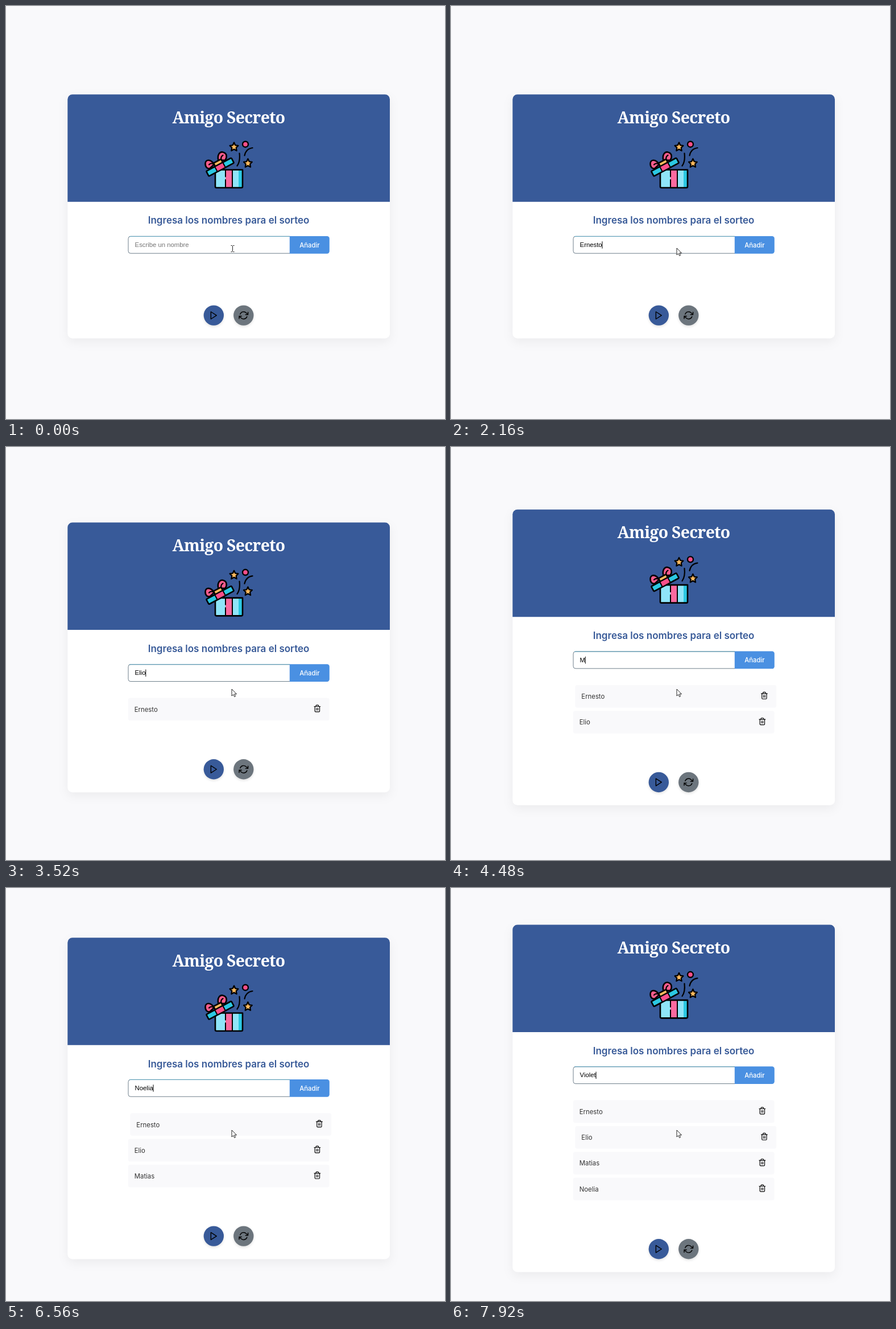
An HTML page that plays this animation: 772 by 725 pixels, repeating every 8 s.

```html
<!DOCTYPE html>
<html lang="es">
<head>
<meta charset="utf-8">
<title>Amigo Secreto</title>
<style>
html, body { margin: 0; width: 100%; height: 100%; overflow: hidden; background: #f9f9fb; }
svg { display: block; }
text { font: 400 11.33px Inter, sans-serif; white-space: pre; }
.title { font: 700 28.3px Merriweather, "Noto Serif", serif; letter-spacing: -.7px; fill: #fff; text-anchor: middle; }
.sub { font-size: 17px; font-weight: 600; fill: #385a98; text-anchor: middle; }
.add { font-weight: 500; fill: #fff; text-anchor: middle; }
.field { font-family: Arial, "Liberation Sans", sans-serif; }
.name { fill: #333; }
.card { filter: drop-shadow(0 6px 9px rgba(0, 0, 0, .055)); }
.round { filter: drop-shadow(0 2px 2px rgba(0, 0, 0, .12)); }
.icon { fill: none; stroke: #000; stroke-width: 2; stroke-linecap: round; stroke-linejoin: round; }
.gift { stroke: #000; stroke-width: 2.6; stroke-linecap: round; stroke-linejoin: round; }
</style>
</head>
<body>
<svg width="772" height="725" viewBox="0 0 772 725">
  <defs>
    <path id="star" d="M0-7.4 2.3-2.6 7.4-1.9 3.7 1.8 4.6 7 0 4.5-4.6 7-3.7 1.8-7.4-1.9-2.3-2.6Z" fill="#fdb95e" stroke-width="2.3"/>
    <g id="trash" class="icon">
      <path d="M3 6H21M19 6v14a2 2 0 0 1-2 2H7a2 2 0 0 1-2-2V6m3 0V4a2 2 0 0 1 2-2h4a2 2 0 0 1 2 2v2M10 11v6M14 11v6"/>
    </g>
  </defs>
  <g id="card">
    <rect id="panel" class="card" x="108.3" width="566.7" height="428.3" rx="8.5" fill="#fff"/>
    <path d="M108.3 188.5V8.5a8.5 8.5 0 0 1 8.5-8.5H666.5a8.5 8.5 0 0 1 8.5 8.5V188.5Z" fill="#385a99"/>
    <text class="title" x="391.5" y="50.5">Amigo Secreto</text>

    <g class="gift" transform="translate(0 -155.2)">
      <g stroke="none">
        <path d="M368 288H416V319H368Z" fill="#8fe5f8"/>
        <path d="M409 288H416V319H409Z" fill="#2cc8e2"/>
        <path d="M386 288H398V319H386Z" fill="#fb6a9f"/>
      </g>
      <path d="M386 288V299.500M386 305V319M398 288V319" stroke-width="2"/>
      <path d="M368 287.500H416V317a2 2 0 0 1-2 2H370a2 2 0 0 1-2-2Z" fill="none"/>
      <path d="M366 278C360 268 350.500 269 350.500 277C350.500 283 354 286 358.500 285Z" fill="#fb5c8c"/>
      <path d="M366 278C362 275.500 359 276 357 278.500" fill="none" stroke-width="2.2"/>
      <path d="M373.500 271C371 261 376 255.500 381 256.500C389 258 389 266 385.500 270.500Z" fill="#fb5c8c"/>
      <path d="M378.500 270C377.500 266 379 263.500 381.500 262" fill="none" stroke-width="2.2"/>
      <g transform="translate(376.500 282.700) rotate(-28)">
        <rect x="-7" y="-11.500" width="15" height="7" rx="1" fill="#fdb95e"/>
        <rect x="-25" y="-5" width="50" height="10" rx="1.500" fill="#2cc8e2"/>
        <rect x="-8" y="-5" width="16" height="10" fill="#fb4f8a" stroke-width="2"/>
      </g>
      <path d="M410.500 258.500C411.500 267 410.500 275 406.500 280.500M419.500 262.500C421 255 426 250 433.500 249" fill="none" stroke-width="2.2"/>
      <circle cx="421" cy="242.700" r="5" fill="#fb4f8a" stroke-width="2.4"/>
      <use href="#star" x="401" y="247"/>
      <use href="#star" x="425.400" y="275.700"/>
    </g>

    <text class="sub" x="391.6" y="227.3">Ingresa los nombres para el sorteo</text>
    <path d="M499 249.200H219a4 4 0 0 0-4 4V275a4 4 0 0 0 4 4H499" fill="#fff" stroke="#6f7f8c"/>
    <path d="M217 249.700Q218 249.200 219 249.200H499" fill="none" stroke="#5aa3bf"/>
    <path d="M498.800 248.700H564.600a4.200 4.200 0 0 1 4.200 4.200V275.300a4.200 4.200 0 0 1-4.200 4.200H498.800Z" fill="#4a90e2"/>
    <text class="add" x="534" y="268.4">Añadir</text>
    <text class="field" id="field" x="226.6" y="267.9"></text>
    <rect id="caret" y="258" width="1" height="12.500"/>

    <g id="rows"></g>

    <g id="actions">
      <circle class="round" cx="365.300" r="17.700" fill="#385a99"/>
      <path class="icon" transform="translate(356.800 -8.500) scale(.7083)" d="M5 3 19 12 5 21Z"/>
      <circle class="round" cx="417.800" r="17.700" fill="#6c757d"/>
      <path class="icon" transform="translate(409.300 -8.500) scale(.7083)" d="M23 4v6h-6M1 20v-6h6M3.510 9a9 9 0 0 1 14.850-3.360L23 10M1 14l4.640 4.360A9 9 0 0 0 20.490 15"/>
    </g>
  </g>
  <path id="beam" d="M395.500 420.500H397.500L398.500 421.500 399.500 420.500H401.500M398.500 421.500V430.500M395.500 431.500H397.500L398.500 430.500 399.500 431.500H401.500" fill="none" stroke="#222"/>
  <path id="arrow" d="M397 425V437L399.800 434.500 401.700 438.500 403.600 437.600 401.800 433.700H405.500Z" fill="#fff" stroke="#111" stroke-width=".9" stroke-linejoin="round"/>
</svg>
<script>
const LOOP = 8000, PITCH = 45.33, BLINK = 530, SLIDE = 3.54;
// start of typing, time per key, moment the name is added
const entries = [
  { name: 'Ernesto', start: 900, key: 165, add: 2400 },
  { name: 'Elio', start: 2880, key: 180, add: 3760 },
  { name: 'Matias', start: 4400, key: 100, add: 5120 },
  { name: 'Noelia', start: 5520, key: 180, add: 6720 },
  { name: 'Violeta', start: 7080, key: 160, add: Infinity }
];
const hovers = [
  { row: 0, from: 3840, to: 5120 },
  { row: 0, from: 5240, to: 6720 },
  { row: 1, from: 6840, to: LOOP }
];

const $ = id => document.getElementById(id);
const show = (el, on) => el.setAttribute('visibility', on ? 'visible' : 'hidden');
const move = (el, x, y) => el.setAttribute('transform', `translate(${x} ${y})`);
const easeOut = p => 1 - (1 - p) ** 3;

$('rows').innerHTML = entries.slice(0, 4).map(e => `<g>
  <rect x="214.700" width="354" height="39.600" rx="4" fill="#f9f9fb"/>
  <text class="name" x="225.800" y="24.300">${e.name}</text>
  <use href="#trash" transform="translate(540.300 11.400) scale(.59)"/></g>`).join('');
const rows = [...$('rows').children];

function typing(t, count) {
  const e = entries[count];
  const keys = Math.min(e.name.length, Math.max(0, Math.floor((t - e.start) / e.key) + 1));
  const cleared = count ? entries[count - 1].add : -BLINK;
  return {
    text: e.name.slice(0, keys),
    last: keys ? e.start + (keys - 1) * e.key : cleared
  };
}

function slide(t, row) {
  const h = hovers.find(h => h.row === row && t >= h.from && t < h.to);
  return h ? SLIDE * easeOut(Math.min(1, (t - h.from) / 200)) : 0;
}

function draw(t) {
  const count = entries.filter(e => t >= e.add).length;
  const height = 428.3 + PITCH * count;
  move($('card'), 0, 155.2 - PITCH / 2 * count);
  $('panel').setAttribute('height', height);
  move($('actions'), 0, height - 40.4);

  rows.forEach((row, i) => {
    show(row, i < count);
    move(row, slide(t, i), 308 + PITCH * i);
  });

  const { text, last } = typing(t, count), field = $('field');
  field.textContent = text || 'Escribe un nombre';
  field.setAttribute('fill', text ? '#000' : '#757575');
  $('caret').setAttribute('x', 226.4 + (text ? field.getComputedTextLength() : 0));
  show($('caret'), (t - last) % (2 * BLINK) < BLINK);

  const idle = t < entries[0].start;
  show($('beam'), idle);
  show($('arrow'), !idle);
}

const origin = performance.now();
function tick() {
  draw((performance.now() - origin) % LOOP);
  requestAnimationFrame(tick);
}
tick();
</script>
</body>
</html>
```
